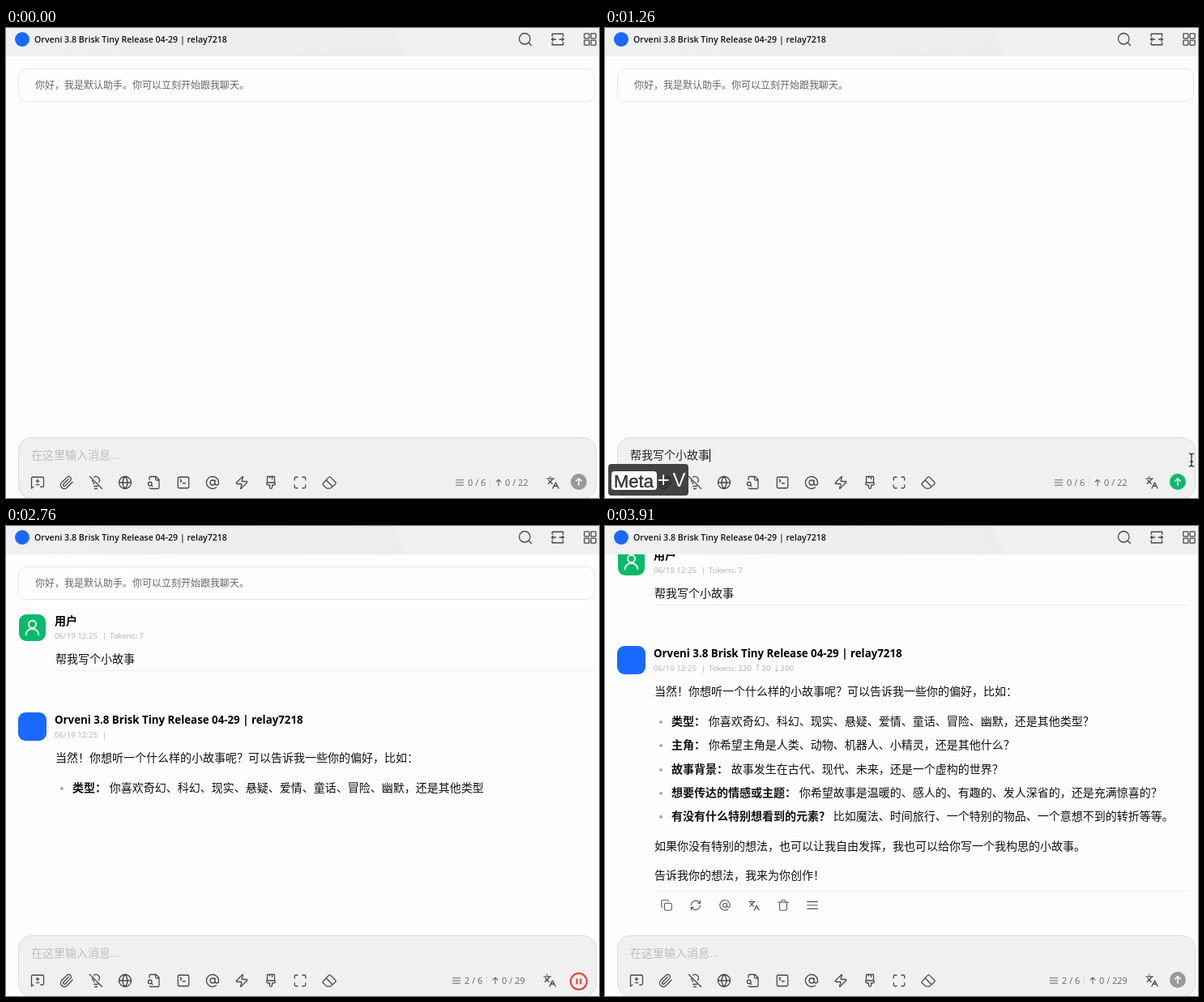
An HTML page for the animation above (3970 ms loop, 732 by 580 pixels).

```html
<!DOCTYPE html>
<html lang="zh-CN">
<head>
<meta charset="utf-8">
<title>Chat</title>
<style>
html, body { margin: 0; width: 100%; height: 100%; overflow: hidden; background: #fdfdfd; }
svg.stage { display: block; width: 732px; height: 580px; }
text { font-family: "Open Sans", "Noto Sans CJK SC", "Noto Sans CJK", sans-serif; white-space: pre; }
.icon { fill: none; stroke-linecap: round; stroke-linejoin: round; }
.key { font-family: "Liberation Sans", Arial, sans-serif; }
.cap { stroke: #333; stroke-width: .4px; }
</style>
</head>
<body>
<script>
const LOOP = 3970;
const MODEL = 'Orveni 3.8 Brisk Tiny Release 04-29 | relay7218';
const PROMPT = '帮我写个小故事';

const tile = (x, y) => `M${x + 1} ${y}h6q1 0 1 1v6q0 1-1 1h-6q-1 0-1-1v-6q0-1 1-1z`;
const ICONS = {
  newChat: 'm5 19-3 2.500V4.500a1.500 1.500 0 0 1 1.500-1.500H20a2 2 0 0 1 2 2v12a2 2 0 0 1-2 2h-3M12 7v5M9.500 9.500h5M9.500 15.500h5',
  clip: 'm21.44 11.05-9.19 9.19a6 6 0 0 1-8.49-8.49l8.57-8.57A4 4 0 1 1 18 8.84l-8.59 8.57a2 2 0 0 1-2.83-2.83l8.49-8.48',
  bulbOff: 'M16.8 11.2c.8-.9 1.2-2 1.2-3.2a6 6 0 0 0-9.3-5M2 2l20 20M6.3 6.3a4.67 4.67 0 0 0 1.2 5.2c.7.7 1.3 1.5 1.5 2.5M9 18h6M10 22h4',
  globe: 'M2 12a10 10 0 1 0 20 0a10 10 0 1 0-20 0h20M12 2a14.5 14.5 0 0 0 0 20 14.5 14.5 0 0 0 0-20',
  fileSearch: 'M14 2v4a2 2 0 0 0 2 2h4M4.3 21a2 2 0 0 0 1.7 1h12a2 2 0 0 0 2-2V7l-5-5H6a2 2 0 0 0-2 2v3M9 18l-1.5-1.5M2 14a3 3 0 1 0 6 0a3 3 0 1 0-6 0',
  terminal: 'M5 3h14a2 2 0 0 1 2 2v14a2 2 0 0 1-2 2H5a2 2 0 0 1-2-2V5a2 2 0 0 1 2-2M7 11l2-2-2-2M11 13h4',
  at: 'M8 12a4 4 0 1 0 8 0a4 4 0 1 0-8 0M16 8v5a3 3 0 0 0 6 0v-1a10 10 0 1 0-4 8',
  zap: 'M4 14a1 1 0 0 1-.78-1.63l9.9-10.2a.5.5 0 0 1 .86.46l-1.92 6.02A1 1 0 0 0 13 10h7a1 1 0 0 1 .78 1.63l-9.9 10.2a.5.5 0 0 1-.86-.46l1.92-6.02A1 1 0 0 0 11 14z',
  brush: 'M10 2v2M14 2v4M17 2a1 1 0 0 1 1 1v9H6V3a1 1 0 0 1 1-1zM6 12a1 1 0 0 0-1 1v1a2 2 0 0 0 2 2h2a1 1 0 0 1 1 1v2.9a2 2 0 1 0 4 0V17a1 1 0 0 1 1-1h2a2 2 0 0 0 2-2v-1a1 1 0 0 0-1-1',
  expand: 'M8 3H5a2 2 0 0 0-2 2v3M21 8V5a2 2 0 0 0-2-2h-3M3 16v3a2 2 0 0 0 2 2h3M16 21h3a2 2 0 0 0 2-2v-3',
  eraser: 'M1.700 13.300 11.300 3.200q1.400-1.400 2.800 0l8.200 8.200q1.400 1.400 0 2.800L14 21.500H8l-6.300-5.800q-1.200-1.200 0-2.400zM7 8l10 10',
  translate: 'm5 8 6 6M4 14l6-6 2-3M2 5h12M7 2h1M22 22l-5-10-5 10M14 18h6',
  search: 'M2 11a9 9 0 1 0 18 0a9 9 0 1 0-18 0M22 22l-4.6-4.6',
  wide: 'M3 7V3h18v4M3 17v4h18v-4M9 12H2M4.500 9.500 2 12l2.500 2.500M15 12h7M19.500 9.500 22 12l-2.500 2.500',
  grid: tile(2.5, 2.5) + tile(13.5, 2.5) + tile(2.5, 13.5) + tile(13.5, 13.5),
  refresh: 'M3 12a9 9 0 0 1 9-9 9.750 9.750 0 0 1 6.740 2.740L21 8M21 3v5h-5M21 12a9 9 0 0 1-9 9 9.750 9.750 0 0 1-6.740-2.740L3 16M3 21v-5h5',
  pen: 'M3 21h18M4 17l1-5L16 2l4 4L9 16z',
  copy: 'M10 8h10a2 2 0 0 1 2 2v10a2 2 0 0 1-2 2H10a2 2 0 0 1-2-2V10a2 2 0 0 1 2-2M4 16a2 2 0 0 1-2-2V4a2 2 0 0 1 2-2h10a2 2 0 0 1 2 2',
  trash: 'M2 6h20M19 6v14a2 2 0 0 1-2 2H7a2 2 0 0 1-2-2V6M8 6V4a2 2 0 0 1 2-2h4a2 2 0 0 1 2 2v2',
  menu: 'M2 5h20M2 12h20M2 19h20',
  up: 'M12 21V3M5 10l7-7 7 7',
  user: 'M7 8a5 5 0 1 0 10 0a5 5 0 1 0-10 0M20.500 22a8.500 8 0 0 0-17 0'
};

const icon = (name, cx, cy, size = 18, color = '#484848', weight = 1.3) => {
  const k = size / 24;
  return `<path class="icon" d="${ICONS[name]}" stroke="${color}" stroke-width="${weight / k}"
    transform="translate(${cx - size / 2} ${cy - size / 2}) scale(${k})"/>`;
};
const text = (x, y, size, color, content, extra = '') =>
  `<text x="${x}" y="${y}" font-size="${size}" fill="${color}" ${extra}>${content}</text>`;
const row = (names, x, y, size, color, weight) =>
  names.map((n, i) => icon(n, x + i * 36, y, size, color, weight)).join('');

// Reply paragraphs: x, centre y, bold label, body
const REPLY = [
  [61, 286, '', '当然！你想听一个什么样的小故事呢？可以告诉我一些你的偏好，比如：'],
  [82, 323, '类型：', '你喜欢奇幻、科幻、现实、悬疑、爱情、童话、冒险、幽默，还是其他类型？'],
  [82, 352, '主角：', '你希望主角是人类、动物、机器人、小精灵，还是其他什么？'],
  [82, 382, '故事背景：', '故事发生在古代、现代、未来，还是一个虚构的世界？'],
  [82, 411, '想要传达的情感或主题：', '你希望故事是温暖的、感人的、有趣的、发人深省的，还是充满惊喜的？'],
  [82, 440, '有没有什么特别想看到的元素？', '比如魔法、时间旅行、一个特别的物品、一个意想不到的转折等等。'],
  [61, 477, '', '如果你没有特别的想法，也可以让我自由发挥，我也可以给你写一个我构思的小故事。'],
  [61, 513, '', '告诉我你的想法，我来为你创作！']
];
const lengthUpTo = n => REPLY.slice(0, n).reduce((s, [, , a, b]) => s + a.length + b.length, 0);
const PAUSED_AT = lengthUpTo(6) - 5;
const STREAM = [[2460, 0], [2820, lengthUpTo(2) + 12], [2940, lengthUpTo(4) + 8], [3120, PAUSED_AT], [3240, lengthUpTo(8)]];
const POINTER = [[180, 321, 572], [420, 306, 532], [720, 306, 532], [1200, 714, 534], [1260, 724, 533],
  [1500, 708, 560], [1740, 708, 560], [1860, 706, 584]];

function sample(track, t) {
  const last = track[track.length - 1];
  if (t >= last[0]) return last.slice(1);
  const i = track.findIndex(p => p[0] > t);
  if (i <= 0) return track[0].slice(1);
  const a = track[i - 1], b = track[i], u = (t - a[0]) / (b[0] - a[0]);
  return a.slice(1).map((v, j) => v + (b[j + 1] - v) * u);
}

function reply(count) {
  let left = count;
  return REPLY.map(([x, y, label, body]) => {
    if (left <= 0) return '';
    const head = label.slice(0, left), tail = body.slice(0, Math.max(0, left - label.length));
    left -= label.length + body.length;
    const dot = label ? `<circle cx="69" cy="${y + 1}" r="2" fill="#aaa"/>` : '';
    const bold = label ? `<tspan font-weight="700">${head}</tspan> ` : '';
    return dot + text(x, y + 5, 14, '#111', bold + tail);
  }).join('');
}

function spinner(t) {
  const early = t < 1860;
  const angle = early ? (t - 1680) * .48 : 45 + (t - 2400) * .48;
  return `<path class="icon" d="M-6.100-1.500A6.300 6.300 0 0 1 6.100-1.500" stroke="#111" stroke-width="2"
    transform="translate(${early ? 76.5 : 68.5} 287) rotate(${angle})"/>`;
}

function messages(t) {
  const scrolled = t >= 3240, done = t >= 3360, right = scrolled ? 722 : 727;
  const rule = y => `<path d="M60 ${y}H${right}" stroke="#efefef"/>`;
  const meta = (y, rest) => text(60, y, 9.7, '#b0b0b0', '06/19 12:25') +
    text(119, y - .5, 9.7, '#b0b0b0', '|') + text(128, y, 9.7, '#b0b0b0', rest);
  const question = `<rect x="16" y="109" width="33" height="33" rx="9" fill="#0aba6b"/>` +
    icon('user', 32.5, 125, 22, '#fff', 1.9) +
    text(60, 122, 14, '#000', '用户', 'font-weight="700"') + meta(139, 'Tokens: 7') +
    text(61, 169, 14, '#111', PROMPT) + rule(178.5) +
    (t < 1860 ? row(['refresh', 'pen', 'copy', 'trash'], 604, 196, 15, '#8a8a8a', 1.1) : '');
  const answer = `<rect x="15" y="230" width="35" height="35" rx="9" fill="#1a69ff"/>` +
    text(60, 244, 13.3, '#000', MODEL, 'font-weight="700"') +
    meta(261, done ? 'Tokens: 220 ↑20 ↓200' : '') +
    (t < 2520 ? spinner(t) : reply(Math.round(sample(STREAM, t)[0]))) +
    (done ? rule(532.5) + row(['copy', 'refresh', 'at', 'translate', 'trash', 'menu'], 76, 550, 15, '#555', 1.1) : '');
  return `<g transform="translate(0 ${scrolled ? -81 : 0})">${question}</g>
    <g transform="translate(0 ${scrolled ? -82 : 0})">${answer}</g>`;
}

function composer(t) {
  const pasted = t >= 840 && t < 1620, sent = t >= 1620, busy = sent && t < 3360;
  const dx = !sent ? 0 : busy ? -4 : -6;
  const tokens = !sent ? '0 / 22' : t < 1860 ? '7 / 22' : busy ? '0 / 29' : '0 / 229';
  const caret = (t >= 420 && t < 1620) || (t >= 3730 && t < 3910);
  const caretX = pasted ? 129.5 : 31.5;
  const button = busy
    ? `<circle cx="707" cy="562" r="10" fill="none" stroke="#ee3b35" stroke-width="2"/>
       <path d="M704.700 558.500v7M709.300 558.500v7" stroke="#ee3b35" stroke-width="2"/>`
    : `<circle cx="707" cy="560" r="10" fill="${pasted ? '#0aba6b' : '#999'}"/>` + icon('up', 707, 560, 11, '#fff', 1.5);
  return (pasted ? text(31, 532, 14, '#222', PROMPT) : text(31, 532, 14, '#bcbcbc', '在这里输入消息...')) +
    (caret ? `<path d="M${caretX} 519.500v16" stroke="#000"/>` : '') +
    `<g transform="translate(${dx} 0)">` +
    icon('menu', 560, 561, 11, '#666', 1) + text(570, 565, 11, '#666', sent ? '2 / 6' : '0 / 6') +
    `<path d="M597.500 555v12" stroke="#ddd"/>` + icon('up', 608, 561, 10, '#666', 1.1) +
    text(616, 565, 11, '#666', tokens) + '</g>' +
    icon('translate', busy ? 671 : 675, 561, 17) + button;
}

function keys(t) {
  if (t < 540 || t >= 2040) return '';
  const full = t >= 840;
  return `<rect x="4" y="538" width="${full ? 99 : 81}" height="39" rx="4" fill="#222" fill-opacity=".84"/>
    <rect x="8" y="547" width="56" height="23" rx="4" fill="#fff"/>` +
    text(11, 567, 22, '#333', 'Meta', 'class="key cap"') +
    text(64.5, 566, 26, '#fff', '+', 'class="key"') +
    (full ? text(83.5, 566, 24, '#fff', 'V', 'class="key"') : '');
}

function pointer(t) {
  if (t < 180 || t >= 1860) return '';
  const [x, y] = sample(POINTER, t);
  const pressed = (t >= 420 && t < 720) || (t >= 1560 && t < 1740);
  const halo = pressed ? `<circle r="14.500" fill="#64a4ff" fill-opacity=".68"/>
    <path d="M-3.500-14.070A14.500 14.500 0 0 0-3.500 14.070z" fill="#2f7ff5" fill-opacity=".75"/>` : '';
  const beam = 'M-3-8q3 0 3 2v12q0 2-3 2M3-8q-3 0-3 2M3 8q-3 0-3-2M-2 2h4';
  const shape = t >= 1440
    ? `<path class="icon" d="M-1-1q1.500-1.500 2.500 0v6l6 1.500q2 1 1.500 3l-1.500 6h-7.500l-4-6q-.500-2 1.500-1.500l1.500 1.500z
        M3 10v3M5.500 10v3" style="fill:#fff" stroke="#111" stroke-width="1.100"/>`
    : `<path class="icon" d="${beam}" stroke="#fff" stroke-width="2.600"/>
       <path class="icon" d="${beam}" stroke="#111" stroke-width="1.200"/>`;
  const haloX = t >= 1440 ? -1.5 : -.5;
  return `<g transform="translate(${x} ${y})"><g transform="translate(${haloX} 0)">${halo}</g>${shape}</g>`;
}

const TOOLS = ['newChat', 'clip', 'bulbOff', 'globe', 'fileSearch', 'terminal', 'at', 'zap', 'brush', 'expand', 'eraser'];
document.body.innerHTML = `<svg class="stage" viewBox="0 0 732 580">
  <defs>
    <clipPath id="view"><rect y="35" width="732" height="468"/></clipPath>
    <linearGradient id="sheen"><stop stop-color="#f0f0f0"/><stop offset="1" stop-color="#eeeceb"/></linearGradient>
  </defs>
  <rect width="732" height="580" fill="#fdfdfd"/>
  <g clip-path="url(#view)">
    <g id="welcome"><rect x="15.500" y="50.500" width="711" height="40" rx="9.500" fill="#fefefe" stroke="#e6e6e6"/>
    ${text(36, 75, 12, '#666', '你好，我是默认助手。你可以立刻开始跟我聊天。')}</g>
    <g id="messages"></g>
  </g>
  <rect width="732" height="35" fill="#f1f0f0"/>
  <path d="M0 0H478L492 35H0z" fill="url(#sheen)"/>
  <circle cx="20" cy="14" r="9" fill="#1a69ff"/>
  ${text(35, 18, 10.6, '#111', MODEL, 'font-weight="600"')}
  ${icon('search', 641, 14)}${icon('wide', 681, 14)}${icon('grid', 721, 14)}
  <rect x="15.500" y="505.500" width="713" height="75" rx="16" fill="#f0f0f0" stroke="#dadada"/>
  ${row(TOOLS, 39, 561)}
  <g id="composer"></g><g id="keys"></g><g id="pointer"></g>
</svg>`;

const layer = id => document.getElementById(id);
const painted = {};
function paint(id, markup) {
  if (painted[id] !== markup) layer(id).innerHTML = painted[id] = markup;
}

const HOLDS = [2940, 3120, 3240, 3360, 3730, 3910];
function tick(t) {
  if (t < 180) return 0;
  if (t >= 2400 && t < 2520) return 2400;
  if (t >= 2820 && t < 2940) return 2820;
  return t < 2940 ? Math.floor(t / 60) * 60 : HOLDS.filter(h => h <= t).pop();
}

function render(time) {
  const t = tick(time);
  layer('welcome').style.display = t >= 3240 ? 'none' : '';
  paint('messages', t >= 1620 ? messages(t) : '');
  paint('composer', composer(t));
  paint('keys', keys(t));
  paint('pointer', pointer(t));
}

const start = performance.now();
function loop() {
  render((performance.now() - start) % LOOP);
  requestAnimationFrame(loop);
}
loop();
</script>
</body>
</html>
```
